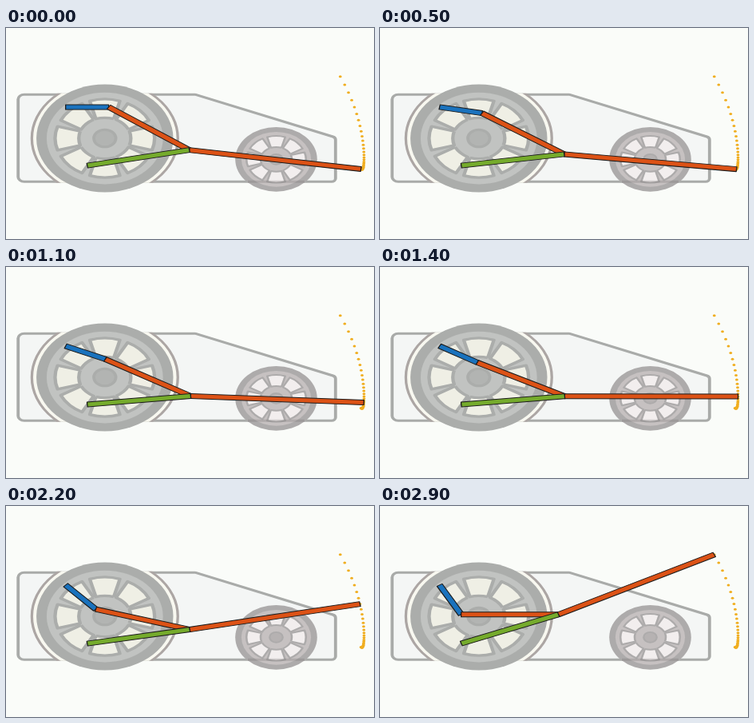
These frames come from a looping animation (461 px wide and 264 px high, 3000 ms). An HTML page with a canvas:

```html
<!DOCTYPE html>
<html lang="en">
<head>
<meta charset="utf-8">
<title>Four-bar linkage</title>
<style>
html, body { margin: 0; width: 461px; height: 264px; overflow: hidden; background: #fafcf9; }
canvas { display: block; }
</style>
</head>
<body>
<canvas id="stage" width="461" height="264"></canvas>
<script>
const ctx = document.getElementById('stage').getContext('2d');
const STRETCH = 1.27; // the drawing is wider than its true proportions
const STEPS = 30, STEP_MS = 100, DEG = Math.PI / 180;

// Linkage geometry in unstretched units
const crankPivot = { x: 58.8, y: 98.9 };
const rockerPivot = { x: 80.2, y: 172.1 };
const CRANK = 42.5, COUPLER = 96, ROCKER = 102.5, ARM = 171, BEND = 26.05 * DEG;

const polar = (p, r, a) => ({ x: p.x + r * Math.cos(a), y: p.y + r * Math.sin(a) });

function pose(step) {
  const pin = polar(crankPivot, CRANK, 60 * DEG * step / (STEPS - 1));
  const dx = rockerPivot.x - pin.x, dy = rockerPivot.y - pin.y;
  const d = Math.hypot(dx, dy);
  const cosine = (COUPLER ** 2 + d * d - ROCKER ** 2) / (2 * COUPLER * d);
  const angle = Math.atan2(dy, dx) - Math.acos(cosine);
  const joint = polar(pin, COUPLER, angle);
  return { pin, joint, tip: polar(joint, ARM, angle - BEND) };
}

const poses = Array.from({ length: STEPS }, (_, i) => pose(i));

function disc(x, y, r, fill, stroke, width) {
  ctx.beginPath();
  ctx.arc(x, y, r, 0, 2 * Math.PI);
  if (fill) { ctx.fillStyle = fill; ctx.fill(); }
  if (stroke) { ctx.strokeStyle = stroke; ctx.lineWidth = width; ctx.stroke(); }
}

function bar(a, b, color) {
  ctx.save();
  ctx.translate(a.x, a.y);
  ctx.rotate(Math.atan2(b.y - a.y, b.x - a.x));
  ctx.beginPath();
  ctx.rect(0, -3, Math.hypot(b.x - a.x, b.y - a.y), 6);
  ctx.fillStyle = color;
  ctx.fill();
  ctx.strokeStyle = '#1c1c1c';
  ctx.lineWidth = 1;
  ctx.stroke();
  ctx.restore();
}

function bodyPath() {
  const pts = [[237, 83.2, 3], [412.8, 137, 4], [412.8, 192.3, 4], [15.2, 192.3, 6], [15.2, 83.2, 6]];
  ctx.beginPath();
  ctx.moveTo(100 / STRETCH, 83.2);
  pts.forEach(([x, y, r], i) => {
    const next = pts[i + 1] || [100, 83.2];
    ctx.arcTo(x / STRETCH, y, next[0] / STRETCH, next[1], r);
  });
  ctx.closePath();
}

function wheel(x, y, r, c) {
  disc(x, y, r, c.tyre);
  disc(x, y, r * 0.85, c.rim);
  ctx.lineJoin = 'round';
  for (let i = 0; i < 8; i++) {
    ctx.save();
    ctx.translate(x, y);
    ctx.rotate(i * 45 * DEG);
    ctx.beginPath();
    ctx.moveTo(r * 0.36, r * 0.13);
    ctx.lineTo(r * 0.69, r * 0.22);
    ctx.quadraticCurveTo(r * 0.765, 0, r * 0.69, -r * 0.22);
    ctx.lineTo(r * 0.36, -r * 0.13);
    ctx.quadraticCurveTo(r * 0.4, 0, r * 0.36, r * 0.13);
    ctx.fillStyle = c.hole;
    ctx.fill();
    ctx.strokeStyle = c.tyre;
    ctx.lineWidth = r * 0.05;
    ctx.stroke();
    ctx.restore();
  }
  disc(x, y, r * 0.16, c.hub, c.tyre, r * 0.045);
}

function drawCar() {
  const line = '#a9aba9', cx = 123.8 / STRETCH, cy = 138;
  bodyPath();
  ctx.fillStyle = '#f4f6f5';
  ctx.fill();
  ctx.strokeStyle = line;
  ctx.lineWidth = 3;
  ctx.stroke();

  ctx.save();
  ctx.beginPath();
  ctx.rect(0, 81.7, 363, 112.1);
  ctx.clip();
  disc(cx, cy, 72, '#f8f8f0', '#aca6a4', 2.6);
  ctx.restore();

  wheel(cx, cy, 67.5, { tyre: '#abadab', rim: '#c1c3c1', hole: '#efefe5', hub: '#b2b4b2' });
  wheel(338.5 / STRETCH, 164.3, 40.4, { tyre: '#adabab', rim: '#c6c1c1', hole: '#f2eeee', hub: '#b6b2b2' });

  // The sill shows faintly through the front tyre
  ctx.fillStyle = 'rgba(110, 105, 105, 0.25)';
  ctx.fillRect(303 / STRETCH, 190.8, 71 / STRETCH, 3);
}

function draw() {
  const { pin, joint, tip } = poses[Math.floor(performance.now() / STEP_MS) % STEPS];
  ctx.setTransform(1, 0, 0, 1, 0, 0);
  ctx.fillStyle = '#fafcf9';
  ctx.fillRect(0, 0, 461, 264);
  ctx.scale(STRETCH, 1);
  drawCar();
  poses.forEach(p => disc(p.tip.x, p.tip.y, 1.5, '#f0ae20'));
  bar(crankPivot, pin, '#1a72bd');
  bar(pin, joint, '#dc5216');
  bar(joint, tip, '#dc5216');
  bar(rockerPivot, joint, '#75ab2c');
  requestAnimationFrame(draw);
}

draw();
</script>
</body>
</html>
```
